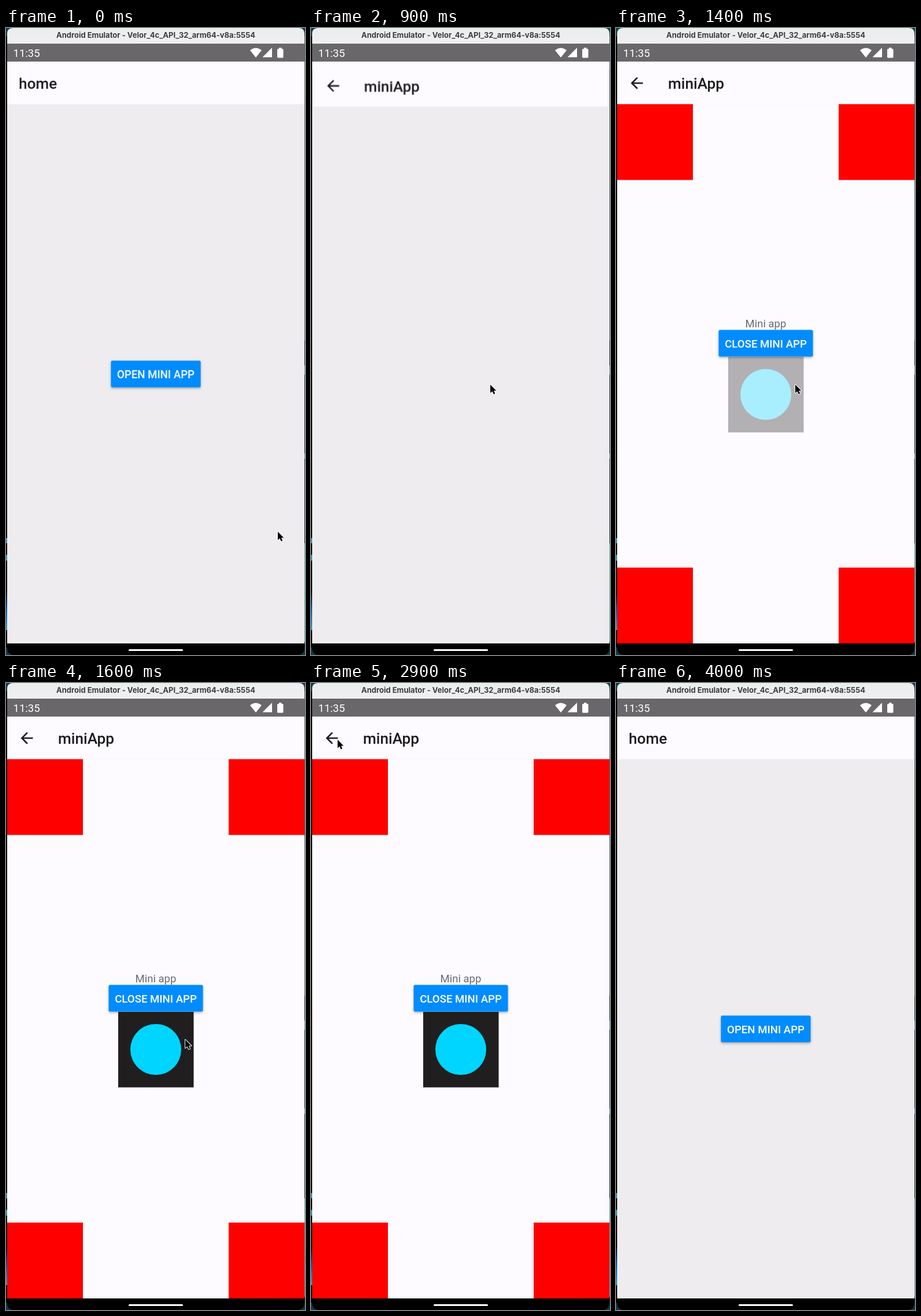
These frames come from a looping animation (517x1083 px, 4250 ms). An HTML page:

```html
<!DOCTYPE html>
<html lang="en">
<head>
<meta charset="utf-8">
<title>Mini app navigation</title>
<style>
html, body { margin: 0; width: 100%; height: 100%; overflow: hidden; background: #000; }
svg { display: block; width: 517px; height: 1083px; font-family: Roboto, sans-serif; }

.title { font: 500 26.2px Roboto, sans-serif; fill: #1c1b1e; }
.label { font: 500 18.6px Roboto, sans-serif; fill: #fff; text-anchor: middle; }
.button { fill: #008cff; filter: drop-shadow(0 2px 2px rgba(0, 0, 0, .3)); }

.home, .mini { transform-origin: 259px 560.5px; }
.home { animation: home-scale 4.25s infinite, home-fade 4.25s linear infinite; }
.mini { animation: mini-scale 4.25s infinite, mini-fade 4.25s linear infinite; }
.content { animation: content 4.25s step-end infinite; }
.picture { animation: picture 4.25s linear infinite; }
.cursor { animation: cursor 4.25s linear infinite; }

/* Each transition lasts 450 ms: a quick start, then a long settle. */
@keyframes home-scale {
  0% { transform: scale(1); }
  16.47% { transform: scale(1); animation-timing-function: cubic-bezier(.3, 0, .8, .15); }
  18.235% { transform: scale(1.06); animation-timing-function: cubic-bezier(.05, .7, .1, 1); }
  27.06% { transform: scale(1.15); }
  69.88% { transform: scale(1.15); animation-timing-function: cubic-bezier(.3, 0, .8, .15); }
  71.65% { transform: scale(1.09); animation-timing-function: cubic-bezier(.05, .7, .1, 1); }
  80.47%, 100% { transform: scale(1); }
}
@keyframes home-fade {
  0%, 27.06% { opacity: 1; }
  27.07%, 69.88% { opacity: .84; }
  80.47%, 100% { opacity: 1; }
}
@keyframes mini-scale {
  0% { transform: scale(.85); }
  16.47% { transform: scale(.85); animation-timing-function: cubic-bezier(.3, 0, .8, .15); }
  18.235% { transform: scale(.91); animation-timing-function: cubic-bezier(.05, .7, .1, 1); }
  27.06% { transform: scale(1); }
  69.88% { transform: scale(1); animation-timing-function: cubic-bezier(.3, 0, .8, .15); }
  71.65% { transform: scale(.94); animation-timing-function: cubic-bezier(.05, .7, .1, 1); }
  80.47%, 100% { transform: scale(.85); }
}
@keyframes mini-fade {
  0%, 17.65% { opacity: 0; }
  18.82%, 70.71% { opacity: 1; }
  71.88%, 100% { opacity: 0; }
}
@keyframes content {
  0% { opacity: 0; }
  30.59%, 100% { opacity: 1; }
}
@keyframes picture {
  0%, 30.59% { opacity: 0; }
  37.65%, 100% { opacity: 1; }
}
@keyframes cursor {
  0% { transform: translate(470px, 870px); }
  1.18% { transform: translate(470px, 870px); animation-timing-function: ease-in-out; }
  11.76%, 14.12% { transform: translate(298px, 613px); }
  18.82% { transform: translate(310px, 616px); }
  38.82% { transform: translate(310px, 616px); animation-timing-function: ease-in; }
  50.59% { transform: translate(189px, 344px); animation-timing-function: ease-out; }
  61.18% { transform: translate(46px, 98px); }
  91.76% { transform: translate(46px, 98px); animation-timing-function: ease-in; }
  94.1%, 100% { transform: translate(110px, -30px); }
}
</style>
</head>
<body>
<svg viewBox="0 0 517 1083">
  <defs>
    <linearGradient id="bar" x2="0" y2="1">
      <stop stop-color="#e9eeee"/><stop offset="1" stop-color="#f0eff0"/>
    </linearGradient>
    <linearGradient id="glow" x2="0" y2="1">
      <stop stop-color="#001020"/><stop offset=".5" stop-color="#0a62b4"/><stop offset="1" stop-color="#2fa3c8"/>
    </linearGradient>
    <clipPath id="screen"><path d="M2 58H516V1063H2Z"/></clipPath>
  </defs>

  <!-- Desktop showing around the window -->
  <path d="M0 0H517V1083H0Z"/>
  <path d="M0 0H517V14H0Z" fill="#07434d"/>
  <path d="M516 14H517V540H516Z" fill="#4d6a70"/>
  <path d="M516 540H517V1083H516Z" fill="#12303a"/>
  <path d="M516 583h1v16h-1zM516 735h1v9h-1zM516 890h1v170h-1z" fill="#55a5a8"/>
  <path d="M0 881h2v9H0zM0 910h2v10H0z" fill="#2f9aae"/>
  <path d="M0 975h2v65H0z" fill="url(#glow)"/>
  <path d="M505 1083h12v-14zM0 1069v14h12z" fill="#0b3b45"/>

  <!-- Window frame -->
  <path d="M2 1060H516V1071Q516 1083 504 1083H14Q2 1083 2 1071Z"/>
  <path d="M2 27V10Q2 0 12 0H506Q516 0 516 10V27Z" fill="url(#bar)"/>
  <text x="259" y="17" text-anchor="middle" font-family="Inter, sans-serif" font-size="13" font-weight="700" fill="#3d3c3e">Android Emulator - Velor_4c_API_32_arm64-v8a:5554</text>
  <rect x="212" y="1073" width="94" height="3" rx="1.5" fill="#fff"/>

  <g clip-path="url(#screen)">
    <path d="M2 58H516V1063H2Z" fill="#eeecee"/>

    <g class="home">
      <path d="M2 58H516V1063H2Z" fill="#eeecee"/>
      <path d="M2 58H516V131.5H2Z" fill="#fdfbff"/>
      <text class="title" x="22" y="105">home</text>
      <rect class="button" x="181.5" y="574.5" width="155" height="46" rx="2.5"/>
      <text class="label" x="259" y="605">OPEN MINI APP</text>
    </g>

    <g class="mini">
      <path d="M2 58H516V1063H2Z" fill="#eeecee"/>
      <path d="M2 58H516V131.5H2Z" fill="#fdfbff"/>
      <path transform="translate(20.3 79.5) scale(1.31)" fill="#1c1b1e" d="M20 11H7.83l5.59-5.59L12 4l-8 8 8 8 1.41-1.41L7.83 13H20z"/>
      <text class="title" x="90" y="105">miniApp</text>
      <g class="content">
        <path d="M2 131.5H516V1063H2Z" fill="#fdfbff"/>
        <path d="M2 131.5h131v131H2zM385 131.5h131v131H385zM2 932h131v131H2zM385 932h131v131H385z" fill="#f00"/>
        <text x="259" y="516.5" text-anchor="middle" font-size="18.5" fill="#6a696c">Mini app</text>
        <rect class="button" x="177.5" y="521.5" width="163" height="46" rx="2.5"/>
        <text class="label" x="259" y="552">CLOSE MINI APP</text>
        <g class="picture">
          <path d="M194 568H324.500V698.500H194Z" fill="#201e1f"/>
          <circle cx="259" cy="633" r="44" fill="#00d5ff"/>
        </g>
      </g>
    </g>
  </g>

  <!-- Status bar -->
  <path d="M2 27H516V58H2Z" fill="#69676a"/>
  <g fill="#fff">
    <text x="12.500" y="49.500" font-size="18.500">11:35</text>
    <path d="M422 38.500Q432 30.500 442 38.500L432 51ZM460 34V50.500H443.500Z"/>
    <path d="M472 34h4.500v2H478q1.500 0 1.500 1.500V50q0 1.500-1.500 1.500H470.500Q469 51.500 469 50V37.500Q469 36 470.500 36H472Z"/>
  </g>

  <path class="cursor" d="M0 0V14.500L3.400 11.500 5.700 16.600 8.300 15.500 6 10.500H10.400Z" stroke="#fff" stroke-width="1.800" stroke-linejoin="round" paint-order="stroke"/>
</svg>
</body>
</html>
```
